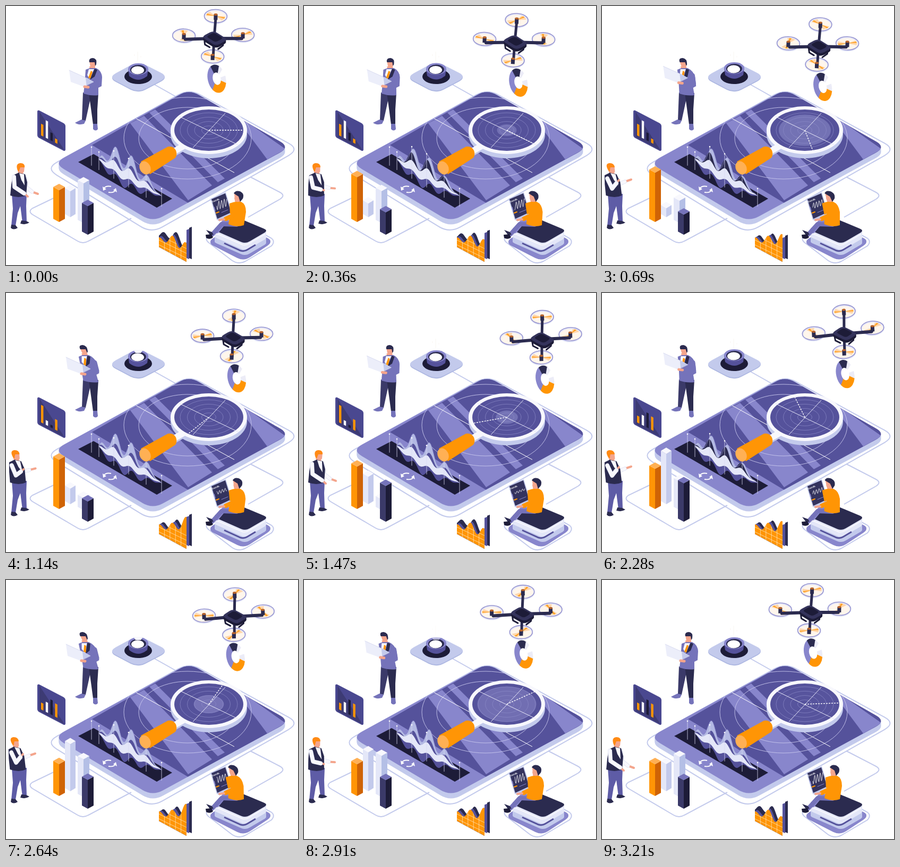
An HTML page for the animation above (3.24 s loop, 550 by 488 pixels).

```html
<!DOCTYPE html>
<html lang="en">
<head>
<meta charset="utf-8">
<title>Isometric analytics</title>
<style>
html, body { margin: 0; width: 100%; height: 100%; overflow: hidden; background: #fff; }
svg { display: block; width: 550px; height: 488px; }
</style>
</head>
<body>
<svg id="stage" viewBox="0 0 550 488" xmlns="http://www.w3.org/2000/svg"></svg>
<script>
const LOOP = 3240, HALF = LOOP / 2, THIRD = LOOP / 3, STEP = 30;
const TAU = Math.PI * 2;
const C = {
  navy: '#2b2b4f', ink: '#1d1c38', purple: '#55529b', mid: '#7573ba', lav: '#8886cc',
  light: '#c3caec', pale: '#e4e7f8', white: '#f8f8fd', orange: '#ff9505',
  rust: '#cf6306', amber: '#ffb054', skin: '#f4a58c'
};
const stage = document.getElementById('stage');

// Timing
const mix = (a, b, k) => a + (b - a) * k;
const mixPts = (a, b, k) => a.map((p, i) => [mix(p[0], b[i][0], k), mix(p[1], b[i][1], k)]);
const ramp = (t, a, b) => {
  const k = Math.min(1, Math.max(0, (t - a) / (b - a)));
  return k * k * (3 - 2 * k);
};
// Rises to 1 and falls back to 0 once in each half of the loop
const cycle = (t, rise, top, fall, end) => ramp(t % HALF, rise, top) - ramp(t % HALF, fall, end);
const bend = t => cycle(t, 270, 1000, 1150, 1550);
const sway = (t, mean, size, phase) => mean + size * Math.sin(t / LOOP * TAU + phase);

// Steps through three levels, easing at the start of each third
function level(t, values) {
  const i = Math.floor(t / THIRD);
  return mix(values[i], values[(i + 1) % 3], ramp(t % THIRD, 40, 520));
}

// Smooth closed curve through evenly timed values
function spline(values, t) {
  const n = values.length, pos = t / LOOP * n, i = Math.floor(pos), k = pos - i;
  const [p, a, b, q] = [-1, 0, 1, 2].map(j => values[(i + j + n) % n]);
  return a + .5 * k * (b - p + k * (2 * p - 5 * a + 4 * b - q + k * (3 * (a - b) + q - p)));
}

// Markup helpers
const f = n => Math.round(n * 100) / 100;
const pts = list => list.map(p => f(p[0]) + ',' + f(p[1])).join(' ');
const poly = (list, fill, more = '') => `<polygon points="${pts(list)}" fill="${fill}" ${more}/>`;
const path = (d, fill, more = '') => `<path d="${d}" fill="${fill}" ${more}/>`;
const line = (d, color, w, more = '') => path(d, 'none', `stroke="${color}" stroke-width="${w}" ${more}`);
const limb = (list, color, w) => `<polyline points="${pts(list)}" fill="none" stroke="${color}"
  stroke-width="${w}" stroke-linecap="round" stroke-linejoin="round"/>`;
const oval = (x, y, rx, ry, fill, more = '') =>
  `<ellipse cx="${f(x)}" cy="${f(y)}" rx="${f(rx)}" ry="${f(ry)}" fill="${fill}" ${more}/>`;
const ring = (x, y, rx, ry, color, w) => oval(x, y, rx, ry, 'none', `stroke="${color}" stroke-width="${w}"`);
const group = (transform, body) => `<g transform="${transform}">${body}</g>`;
const clip = (id, d, body) => `<clipPath id="${id}"><path d="${d}"/></clipPath><g clip-path="url(#${id})">${body}</g>`;
const lean = (pivot, k, body) => group(`matrix(1 0 ${k.toFixed(3)} 1 ${f(-k * pivot)} 0)`, body);
const range = (from, to, step) => Array.from({ length: Math.floor((to - from) / step) + 1 }, (_, i) => from + i * step);

// Isometric rhombus: two sides running down right (a) and up right (b)
const rhombus = (x, y, a, b, slope = .58) =>
  [[x, y], [x + b, y - b * slope], [x + a + b, y + (a - b) * slope], [x + a, y + a * slope]];

function rounded(list, r) {
  const n = list.length;
  const toward = (a, b) => {
    const k = r / Math.hypot(b[0] - a[0], b[1] - a[1]);
    return [f(mix(a[0], b[0], k)), f(mix(a[1], b[1], k))];
  };
  return list.map((p, i) =>
    `${i ? 'L' : 'M'}${toward(p, list[(i + n - 1) % n])} Q${p} ${toward(p, list[(i + 1) % n])}`).join('') + 'Z';
}
function slab(list, r, h, side, top) {
  const d = rounded(list, r);
  return range(0, h - 1, 1).map(y => group(`translate(0 ${h - y})`, path(d, side))).join('') + path(d, top);
}

function ground() {
  return line('M276 146L324 173'
    + 'M100 357L50 381Q41 387 50 393L135 443Q145 449 155 443L236 400'
    + 'M460 322L516 351Q527 357 516 364L456 398'
    + 'M392 424L382 432Q373 439 382 446L425 479Q438 488 451 481L500 452Q508 443 499 437L484 429'
    + rounded([[75, 306], [345, 156], [553, 270], [274, 428]], 24), C.light, 2);
}

function tablet() {
  const face = [[90, 296], [345, 157], [535, 266], [276, 407]];
  return slab(face, 22, 10, C.light, C.lav)
    + clip('screen', rounded(face, 22),
      poly([[162, 262], [345, 157], [535, 266], [343, 371]], C.purple)
      + poly([[234, 221], [260, 207], [388, 338], [343, 366]], C.lav)
      + poly([[270, 201], [281, 195], [412, 325], [399, 332]], C.lav)
      + poly([[430, 206], [462, 224], [527, 270], [492, 289]], C.lav)
      + ring(342, 249, 120, 77, '#c9c8ee', .9) + ring(342, 249, 92, 58, '#c9c8ee', .9)
      + line('M245 212L430 314', '#fff', 1))
    + line('M184 344q4 -6 14 -4M207 346q-4 7 -14 5', '#fff', 1.8)
    + path('M182 340l1 8l6 -3zM209 351l-2 -8l-5 4z', '#fff');
}

// Wave chart lying on the tablet
function waves(t) {
  const k = cycle(t, 0, 150, 700, 960);
  const xs = range(175, 293, 2);
  const base = x => 289 + .585 * (x - 175);
  const env = x => Math.sin(Math.PI * Math.pow((x - 175) / 118, .75));
  const curve = (size, bias, peak) => xs.map(x =>
    [x, base(x) - size * env(x) * mix(Math.cos(TAU * (x - peak) / 31), 1, bias)]);
  const band = (a, b, color) => poly([...a, ...b.slice().reverse()], color);
  const crest = curve(46 - 4 * k, .62, 206);
  const inner = curve(25 + 9 * k, .55, 206 - 4 * k);
  const flat = curve(0, 0, 0);
  const stems = [161, 175, 203, 231, 264, 293].map((x, i) => {
    const head = base(x) - (i ? 14 + 30 * Math.max(0, env(x)) * mix(.7, 1, k) : 15);
    return line(`M${x} ${f(head)}V${f(base(x) + 20)}`, '#d8daf3', .8) + oval(x, head, 1.3, 1.3, '#fff');
  });
  return poly([[136, 294], [165, 279], [313, 363], [284, 380]], C.ink)
    + band(flat, curve(-26, .7, 222), C.purple)
    + band(crest, inner, '#b3b9e3')
    + band(inner, flat, k > .5 ? C.navy : C.purple)
    + band(curve(17, .6, 202), curve(-12, .65, 218), C.pale)
    + limb(crest, C.lav, .8) + stems.join('');
}

function lens(t) {
  const [x, y] = [382, 234];
  const a = t / LOOP * TAU;
  const pulse = t % THIRD / THIRD;
  const glow = Math.min(1, 1.6 * Math.pow(pulse, 1.5));
  return oval(x, y + 8, 72, 45, C.light)
    + poly([[312, 270], [334, 257], [344, 268], [320, 281]], C.white)
    + line('M319 281L342 268', C.light, 3)
    + oval(x, y, 72, 45, C.white) + oval(x, y, 65, 39, C.purple)
    + oval(x, y, 60 * glow, 36 * glow, '#a9a8df', `opacity="${f(Math.sin(Math.PI * pulse) * .4)}"`)
    + range(1, 4, 1).map(i => ring(x, y, 13.5 * i, 8.2 * i, '#8b8ac8', .7)).join('')
    + line('M326 208L438 262M352 267L413 202', '#e7e7f8', 1)
    + line(`M${x} ${y}L${f(x + 65 * Math.cos(a))} ${f(y + 39 * Math.sin(a))}`, '#fff', 1.4, 'stroke-dasharray="3 2"')
    + path('M254 293L305 265Q315 263 320 272Q323 280 319 286L271 317Z', C.orange)
    + group('rotate(-28 262 305)', oval(262, 305, 10, 13, C.amber));
}

function sensor(t) {
  const y = 119 - 2 * cycle(t, 220, 660, 700, 1000);
  const notch = cycle(t, 780, 980, 1180, 1400);
  return slab([[193, 134], [249, 104], [306, 133], [249, 163]], 16, 2, '#aeb8e2', C.light)
    + oval(249, 133, 26, 14, C.ink)
    + path(`M230 ${y}L232 ${y + 13}Q249 ${y + 27} 266 ${y + 13}L268 ${y}Z`, C.purple)
    + oval(249, y, 19, 11, C.lav) + oval(249, y + 1, 15, 9, C.navy) + oval(248, y + 2, 12, 7.5, '#fff')
    + poly([[240, 107], [244, 113], [254, 113], [258, 107]], C.white, `opacity="${f(notch)}"`)
    + line('M248 86V104M242 91v3M254 94v3', '#f3e9dc', 1, `opacity="${f((1 - notch) * .4)}"`);
}

// Wall panel with hard changes between data sets
function panel(t) {
  const heights = [[22, 33, 15, 8], [33, 9, 5, 20], [13, 19, 28, 25]][Math.floor(t / THIRD)];
  const colors = [C.orange, C.white, C.ink, C.orange];
  const bars = heights.map((h, i) => `<rect x="${7 + i * 8.8}" y="${45 - h}" width="4.4" height="${h}" fill="${colors[i]}"/>`);
  return group('matrix(1 .52 0 1 59 195)', '<rect width="53" height="52" rx="4" fill="#4a4890"/>'
    + poly([[4, 2], [51, 50], [4, 50]], '#3d3b74') + bars.join(''));
}

function bars(t) {
  const box = (x, foot, top, [a, b, c], r = 11) =>
    poly([[x - r, top + 6], [x, top + 12], [x, foot], [x - r, foot - 6]], a)
    + poly([[x + r, top + 6], [x, top + 12], [x, foot], [x + r, foot - 6]], b)
    + poly([[x, top], [x + r, top + 6], [x, top + 12], [x - r, top + 6]], c);
  return box(121, 398, sway(t, 330, 39, .18), [C.pale, C.light, C.white], 10)
    + box(146, 409, sway(t, 348, 29, -1.1), [C.pale, '#b4bfe6', C.white])
    + box(100, 407, level(t, [335, 302, 318]), [C.orange, C.rust, C.amber])
    + box(154, 431, level(t, [365, 381, 345]), ['#3b3a69', C.ink, C.mid]);
}

function laptopMan(t) {
  const k = bend(t);
  const legs = path('M145 163L161 165L155 193L150 216L143 215L144 188Z', '#3b3a69')
    + path('M156 164L174 164L172 195L172 223L164 223L160 193Z', C.navy)
    + path('M142 214L150 216L147 222Q136 225 130 220Z', C.mid)
    + path('M164 222L172 222L173 232Q169 237 164 232Z', C.mid);
  const body = poly([[157, 114], [168, 114], [168, 123], [158, 126]], C.skin)
    + path('M150 120L158 117L170 117Q180 122 181 134L180 151L174 154L174 168Q160 170 146 165L148 148Z', C.mid)
    + poly([[156, 119], [166, 119], [157, 137], [153, 130]], C.white)
    + poly([[160, 122], [163, 124], [159, 137], [155, 135]], C.orange)
    + path('M167 118L172 120L167 133L158 139Z', C.navy)
    + path('M157 104Q163 98 169 104L168 113Q164 120 159 115Z', C.skin)
    + path('M157 106Q155 98 164 98Q172 99 170 110L168 113L167 106Z', C.navy);
  const laptop = poly([[146, 152], [165, 143], [152, 135], [134, 143]], C.light)
    + poly([[119, 121], [150, 135], [152, 154], [122, 143]], '#eceefa')
    + limb([[119, 121], [150, 135], [165, 143], [147, 152]], '#d1d4ed', .8)
    + limb([[148, 152], [155, 153]], C.skin, 5);
  return legs + lean(167, k * .28, body)
    + limb([[176 - 9 * k, 131], [175 - 4 * k, 147], [159 - 3 * k, 152]], C.mid, 9)
    + group(`translate(${f(-6 * k)} ${f(-8 * Math.sin(Math.PI * k))})`, laptop);
}

function vestMan(t) {
  const k = cycle(t, 170, 620, 1040, 1480);
  const arm = (a, b, w) => {
    const p = mixPts(a, b, k), sleeve = p.slice(0, 3);
    return limb(p.slice(1), C.skin, 4) + limb(sleeve, '#d3d8f0', w + 1) + limb(sleeve, C.white, w);
  };
  const legs = path('M11 355L39 354L38 377L39 407L31 408L27 377L22 390L18 414L10 414L13 382Z', '#5e5ca6')
    + path('M10 412L18 413L22 418Q14 423 9 418Z', C.navy)
    + path('M29 404L38 405L44 408Q37 413 27 410Z', C.navy);
  const body = poly([[22, 308], [33, 308], [32, 320], [23, 320]], C.skin)
    + path('M13 319L24 314L36 317L40 332L38 357Q24 363 8 357L10 336Z', C.navy)
    + poly([[25, 315], [34, 317], [35, 338], [29, 328]], C.white)
    + path('M23 300Q30 296 35 302L34 312Q30 318 25 313Z', C.skin)
    + path('M22 310Q17 297 27 296Q36 296 35 304L27 304L24 312Z', '#ff8a14');
  return arm([[35, 322], [38, 341], [49, 350], [60, 354]], [[22, 322], [31, 336], [43, 331], [55, 327]], 6)
    + legs + lean(360, k * .2, body)
    + arm([[15, 322], [16, 341], [34, 353], [41, 359]], [[10, 325], [19, 344], [27, 334], [32, 328]], 7);
}

function seat() {
  const cushion = [[389, 421], [432, 397], [494, 423], [451, 448]];
  const lower = cushion.map(([x, y]) => [x, y + 16]);
  return slab([[379, 444], [434, 412], [504, 442], [448, 479]], 14, 2, C.lav, C.lav)
    + slab(lower, 9, 7, C.light, C.light) + slab(cushion, 9, 13, C.pale, C.navy)
    + line('M411 447L442 461Q449 463 455 459L470 450', C.purple, 3)
    + line('M395 428L446 450Q452 451 457 448L488 430', C.white, 2);
}

function seatedMan(t) {
  const k = .45 * cycle(t, 0, 150, 1020, 1190) + .55 * cycle(t, 150, 900, 1020, 1190);
  const amp = sway(t, 5, 3, Math.PI / 2);
  const trace = range(0, 24, 1).map(i => [397 + i * .78, 377 - i * .3 + amp * Math.sin(i * .95 + t / 250)]);
  const screen = poly([[385, 363], [414, 351], [426, 390], [397, 403]], C.light)
    + poly([[387, 364], [413, 353], [424, 389], [398, 401]], '#34335e')
    + limb(trace, '#fff', .8)
    + `<text transform="translate(388 371) rotate(-23)" font-family="Inter, Arial, sans-serif" font-size="4.5" font-weight="700" fill="#fff">Trends</text>`
    + limb([[392, 379], [394, 386]], C.lav, 1.5)
    + limb([[396, 390], [401, 388]], C.orange, 2) + limb([[406, 389], [418, 384]], C.lav, 1);
  const legs = limb([[438, 410], [411, 407], [397, 424]], C.lav, 9)
    + limb([[434, 412], [406, 411], [389, 430]], C.mid, 8)
    + path('M377 422L388 426L391 431L384 431Z', C.navy)
    + path('M376 431L387 430L390 436Q384 441 377 437Z', C.ink);
  const body = poly([[430, 361], [441, 360], [442, 371], [432, 372]], C.skin)
    + path('M421 372Q432 367 443 369Q452 373 452 388L448 413Q434 418 419 411L422 394Z', C.orange)
    + path('M430 353Q437 350 443 355L441 367Q436 372 431 366Z', C.skin)
    + path('M429 353Q432 347 440 349Q450 353 446 363L441 369L438 359Z', C.navy);
  return screen + legs + lean(413, k * .18, body)
    + poly([[397, 402], [424, 391], [427, 394], [402, 406]], C.light)
    + limb([[428, 377], [427, 395], [414, 401]], C.orange, 8)
    + limb([[411, 402], [402, 403]], C.skin, 4);
}

// Standing area chart
function areaChart(t) {
  const busy = cycle(t, 150, 650, 1140, 1570), late = cycle(t, 690, 1000, 1140, 1500);
  const tilt = .7 * (1 - busy) - .35 * late;
  const area = (lift, shift) => 'M' + range(288, 340, 2).map(x => {
    const size = 4 + (x - 288) * .13;
    return `${x} ${f(440 - lift - size * Math.cos(TAU * (x - 313 - shift) / 25) + tilt * Math.max(0, x - 316))}`;
  }).join('L') + 'V482L288 454Z';
  const front = area(0, 0);
  const edge = 416 + 15 * (busy - late);
  const grid = range(1, 4, 1).map(i => `M${288 + i * 10.4} 410V485M286 ${422 + i * 9}L342 ${449 + i * 9}`).join('');
  const post = (x, y, color) => poly([[x, y + 2], [x + 5, y], [x + 5, 477], [x, 475]], color);
  return path(area(9 - 6 * busy, 8), C.navy) + path(area(2 - busy, 4), C.purple)
    + post(340, edge + 4, C.purple) + post(345, edge, C.navy)
    + path(front, C.orange) + clip('area', front, line(grid, '#ffe1b3', .8));
}

function rotor(x, y, spin) {
  const at = a => `${f(x + 18 * Math.cos(a))} ${f(y + 10 * Math.sin(a))}`;
  const blade = a => path(`M${x} ${y}L${at(a)}A18 10 0 0 1 ${at(a + .9)}Z`, '#ffcf9c', 'opacity=".8"')
    + path(`M${x} ${y}L${at(a + .2)}L${at(a + .45)}Z`, C.orange, 'opacity=".8"');
  return oval(x, y, 21, 12, '#fff6ec') + ring(x, y + 1.5, 21, 12.5, C.pale, 2.5) + ring(x, y, 21.5, 12.5, '#9795d0', 1.6)
    + blade(spin) + blade(spin + Math.PI);
}

function drone(t) {
  const x = spline([392, 403, 424, 455, 461, 426], t);
  const y = spline([61, 73, 84, 87, 79, 68], t);
  const tilt = sway(t, -.6, 3, .7);
  const spin = t / 270 * TAU;
  const arc = (start, size, color) => `<circle r=".72" fill="none" stroke="${color}" stroke-width=".56"
    pathLength="100" stroke-dasharray="${size} 100" stroke-dashoffset="${-start}"/>`;
  const donut = group(`translate(${f(sway(t, x + 5, 3, 0))} ${f(y + 76)}) rotate(-13) scale(17 27)`,
    arc(41, 36, C.lav) + arc(76, 18, C.navy) + arc(93, 7, '#ececf7') + arc(0, 9, '#ececf7') + arc(8, 34, C.orange));
  const hubs = [[2, -42], [-57, -4], [54, -8], [-2, 34]];
  const motor = ([u, v]) => line(`M${u} ${v - 3}v10`, C.navy, 7) + oval(u, v - 3, 3.5, 2, '#b5622c');
  const craft = hubs.map(([u, v], i) => rotor(u, v, spin + i * 1.1)).join('')
    + limb([[-54, 3], [0, 0], [52, -1]], C.navy, 6)
    + limb([[2, -36], [0, 0], [-1, 36]], C.navy, 5)
    + hubs.map(motor).join('')
    + limb([[-18, 6], [-17, 12], [-8, 17]], C.ink, 3) + limb([[17, 5], [17, 13], [8, 20]], C.ink, 3)
    + slab(rhombus(-24, -2, 28, 22), 8, 5, C.ink, '#34335b')
    + path(rounded(rhombus(-15, -3, 18, 14), 5), C.ink);
  return donut + group(`translate(${f(x)} ${f(y)}) rotate(${f(tilt)})`, craft);
}

const statics = [ground, tablet, seat];
const scene = [ground, sensor, tablet, waves, lens, panel, bars, laptopMan, vestMan, seat, seatedMan, areaChart, drone];
const layers = scene.map(draw => {
  const node = document.createElementNS('http://www.w3.org/2000/svg', 'g');
  stage.append(node);
  if (statics.includes(draw)) node.innerHTML = draw();
  return { draw, node };
}).filter(layer => !statics.includes(layer.draw));

const start = performance.now();
let shown = -1;
function render() {
  const t = Math.floor((performance.now() - start) / STEP) * STEP % LOOP;
  if (t !== shown) {
    for (const { draw, node } of layers) node.innerHTML = draw(t);
    shown = t;
  }
  requestAnimationFrame(render);
}
render();
</script>
</body>
</html>
```
